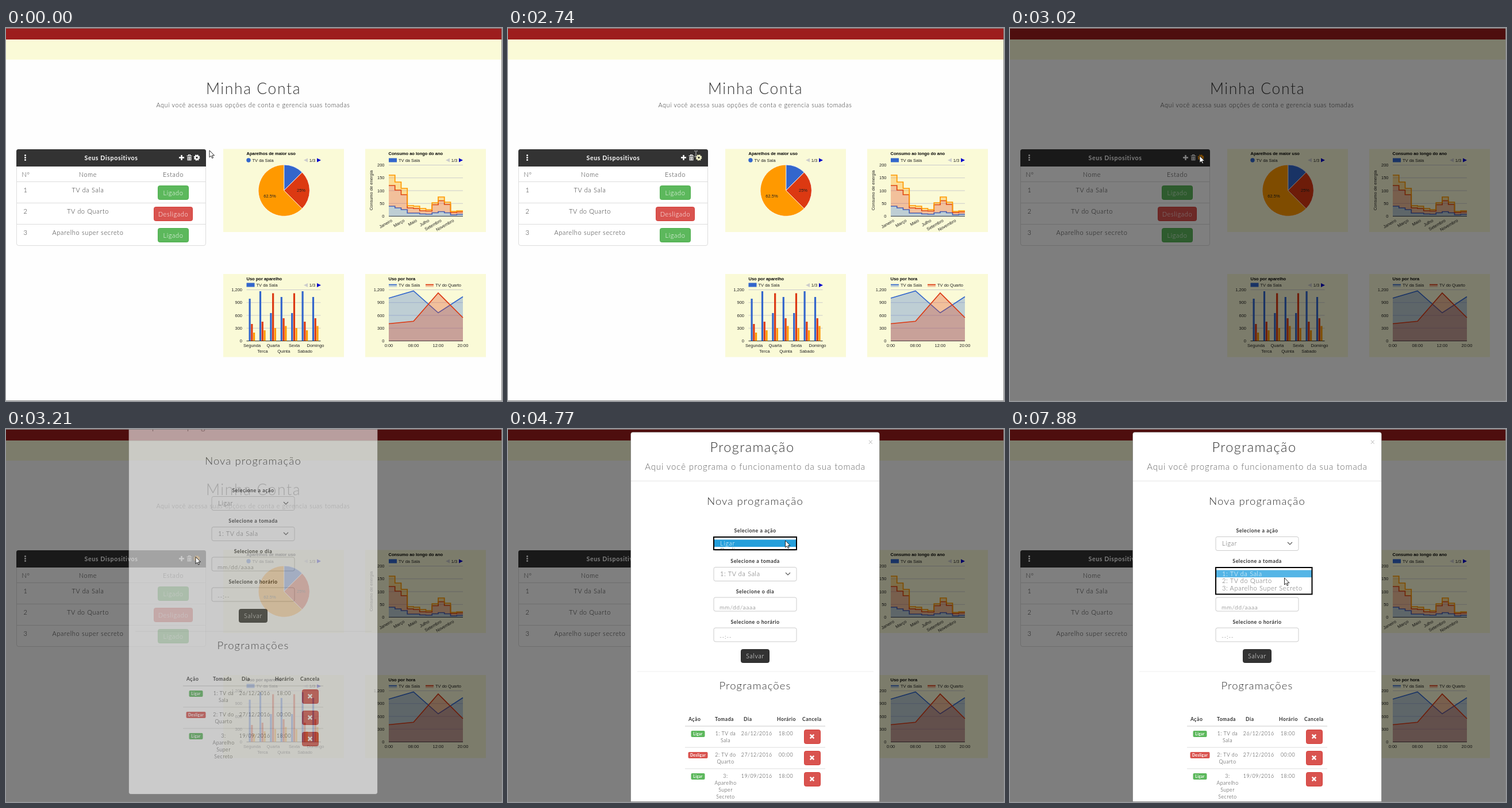
Animation of 863 by 649 pixels, one loop 8 s. Source, as an HTML page:

```html
<!DOCTYPE html>
<html lang="pt">
<head>
<meta charset="utf-8">
<title>Minha Conta</title>
<style>
html, body { margin: 0; width: 100%; height: 100%; overflow: hidden; background: #fff; }
svg { display: block; width: 863px; height: 649px; }
text { font-family: Lato, "Open Sans", sans-serif; font-weight: 300; letter-spacing: .06em; fill: #333; }
.b { font-weight: 700; }
.w { fill: #fff; }
.g { fill: #666; }
.c { font: 7.5px "Liberation Sans", Arial, sans-serif; letter-spacing: 0; fill: #222; }
.cb { font-weight: 700; fill: #000; }
</style>
</head>
<body>
<svg id="stage" viewBox="0 0 863 649" xmlns="http://www.w3.org/2000/svg"></svg>
<script>
const BLUE = '#3366cc', RED = '#dc3912', ORANGE = '#ff9900', CREAM = '#fafad7';
const GREEN_BTN = '#5cb85c', RED_BTN = '#d9534f';

const rect = (x, y, w, h, fill, more = '') =>
  `<rect x="${x}" y="${y}" width="${w}" height="${h}" fill="${fill}" ${more}/>`;
const text = (s, x, y, size, cls = '', anchor = 'middle', more = '') =>
  `<text x="${x}" y="${y}" class="${cls}" text-anchor="${anchor}" style="font-size:${size}px" ${more}>${s}</text>`;
const path = (d, fill, more = '') => `<path d="${d}" fill="${fill}" ${more}/>`;
const line = (d, color, w = 1) => path(d, 'none', `stroke="${color}" stroke-width="${w}"`);
const group = (id, body, more = '') => `<g id="${id}" ${more}>${body}</g>`;
const label = (s, x, y, anchor = 'start', cls = '', more = '') =>
  text(s, x, y, 7.5, 'c ' + cls, anchor, more);
const button = (x, y, w, h, fill, edge, r = 3) =>
  rect(x + .5, y + .5, w - 1, h - 1, fill, `rx="${r}" stroke="${edge}"`);

function devices() {
  let s = rect(18.5, 211.5, 329, 167, '#fff', 'rx="3.5" stroke="#ddd"');
  s += path('M18 241V214.500Q18 211 21.500 211H344.500Q348 211 348 214.500V241Z', '#333');
  for (const y of [267.5, 304.5, 341.5]) s += line(`M18 ${y}H348`, '#ddd');
  s += text('Seus Dispositivos', 183, 229.500, 10.6, 'b w');
  for (const y of [221.5, 225.5, 229.5]) s += `<circle cx="33.500" cy="${y}" r="1.500" fill="#fff"/>`;
  s += line('M301 225.500H310M305.500 221V230', '#fff', 2.4);
  s += line('M314.500 222.500H323.500M317.500 222V220.500H320.500V222', '#fff', 1.2);
  s += path('M315.500 224H322.500V230.500H315.500Z', '#ddd') + line('M317.500 225V229.500M320.500 225V229.500', '#555', .8);
  s += group('gear',
    `<circle cx="332" cy="225.500" r="3" fill="none" stroke="currentColor" stroke-width="2.600"/>
     <circle cx="332" cy="225.500" r="4.500" fill="none" stroke="currentColor" stroke-width="1.800" stroke-dasharray="2 1.534"/>`);
  s += text('Nº', 34.500, 258.500, 11) + text('Nome', 142.500, 258.500, 11) + text('Estado', 291, 258.500, 11);
  [['TV da Sala', 1], ['TV do Quarto', 0], ['Aparelho super secreto', 1]].forEach(([name, on], i) => {
    const y = 37 * i, w = on ? 54 : 68;
    s += text(i + 1, 34, 285.500 + y, 11) + text(name, 142.500, 285.500 + y, 11);
    s += button(291 - w / 2, 274 + y, w, 25, on ? GREEN_BTN : RED_BTN, on ? '#4cae4c' : '#d43f3a');
    s += text(on ? 'Ligado' : 'Desligado', 291, 291 + y, 11, 'w');
  });
  return s;
}

// Shared chart frame: panel, title and, where present, a pager
function frame(x, y, title, pager) {
  let s = rect(x, y, 210, 144.5, CREAM) + label(title, x + 40.5, y + 10.5, 'start', 'cb');
  if (pager) {
    s += path(`M${x + 140} ${y + 19.5}l7 -3.500v7z`, '#ccc');
    s += path(`M${x + 170} ${y + 19.5}l-7 -3.500v7z`, '#00c');
    s += label('1/3', x + 155, y + 22.3, 'middle', '', 'style="fill:#00c"');
  }
  return s;
}

function grid(x, y, names) {
  return names.map((n, i) => {
    const gy = y + i * 22.25, last = i === names.length - 1;
    return line(`M${x} ${gy}h129`, last ? '#333' : '#ccc') + label(n, x - 7.5, gy + 2.7, 'end');
  }).join('');
}

function pie() {
  const cx = 483.7, cy = 282.7, r = 44.7;
  const at = f => `${cx + r * Math.sin(f * 2 * Math.PI)} ${cy - r * Math.cos(f * 2 * Math.PI)}`;
  const slice = (a, b, c) =>
    path(`M${cx} ${cy}L${at(a)}A${r} ${r} 0 ${b - a > .5 ? 1 : 0} 1 ${at(b)}Z`, c, 'stroke="#fff" stroke-width=".8"');
  return frame(378, 210.5, 'Aparelhos de maior uso', 1) +
    `<circle cx="422" cy="230" r="3.700" fill="${BLUE}"/>` + label('TV da Sala', 428.5, 232.8) +
    slice(0, .125, BLUE) + slice(.125, .375, RED) + slice(.375, 1, ORANGE) +
    label('25%', 513.5, 285.2, 'middle', 'w', 'style="fill:#fff"') +
    label('62.5%', 459, 295.3, 'middle', 'w', 'style="fill:#fff"');
}

function year() {
  const w = 10.75, x0 = 666;
  const tops = [
    [310, 313, 316, 322, 322, 323.5, 324, 321.5, 319.5, 321.5, 325, 324],
    [274, 282, 290, 313, 314, 318, 318.5, 307.5, 300.5, 307, 321, 320],
    [256, 268, 279, 309, 310, 314, 316, 304, 294, 303, 319, 318]
  ];
  const steps = a => a.map((y, i) => `${x0 + i * w},${y} ${x0 + (i + 1) * w},${y}`);
  let s = frame(625, 210.5, 'Consumo ao longo do ano', 1) + rect(666, 226.5, 14, 7, BLUE) +
    label('TV da Sala', 683, 232.8) + grid(666, 238.5, [200, 150, 100, 50, 0]);
  tops.forEach((t, i) => {
    const base = i ? steps(tops[i - 1]) : steps(t.map(() => 327.5));
    const back = base.join(' ').split(' ').reverse().join(' ');
    const c = [BLUE, RED, ORANGE][i];
    s += `<polygon points="${steps(t).join(' ')} ${back}" fill="${c}" fill-opacity=".3"/>`;
    s += `<polyline points="${steps(t).join(' ')}" fill="none" stroke="${c}" stroke-width="1.700"/>`;
  });
  ['Janeiro', 'Março', 'Maio', 'Julho', 'Setembro', 'Novembro'].forEach((m, i) => {
    const x = 672.5 + i * w * 2;
    s += label(m, x, 336.5, 'end', '', `transform="rotate(-30 ${x} 336.500)"`);
  });
  return s + label('Consumo de energia', 638, 282.5, 'middle', '', 'style="font-style:italic" transform="rotate(-90 638 282.500)"');
}

function bars() {
  const tops = [
    [471, 458, 496, 468, 496, 458, 468],
    [515, 511, 461.5, 505, 461.5, 511, 505],
    [530, 526, 522, 518.5, 522, 526, 518.5]
  ];
  let s = frame(378, 428, 'Uso por aparelho', 1) + rect(418.5, 443.5, 14, 7, BLUE) +
    label('TV da Sala', 435.5, 450.2) + grid(418.5, 455.5, ['1,200', 900, 600, 300, 0]);
  ['Segunda', 'Terca', 'Quarta', 'Quinta', 'Sexta', 'Sabado', 'Domingo'].forEach((d, i) => {
    const x = 422.5 + i * 18.4;
    tops.forEach((t, k) => s += rect(x + k * 3.75, t[i], 3.2, 544.3 - t[i], [BLUE, RED, ORANGE][k]));
    s += label(d, x + 5.6, i % 2 ? 565 : 555, 'middle');
  });
  return s;
}

function hours() {
  const xs = [666, 709, 752, 795];
  let s = frame(625, 428, 'Uso por hora') + grid(666, 455.5, ['1,200', 900, 600, 300, 0]);
  [[BLUE, 666, 'TV da Sala', [470, 457.5, 495.5, 467.5]], [RED, 730, 'TV do Quarto', [514.5, 510.3, 461, 504]]]
    .forEach(([c, x, name, ys]) => {
      const d = 'M' + xs.map((px, i) => px + ' ' + ys[i]).join('L');
      s += path(d + 'V544.500H666Z', c, 'fill-opacity=".3"') + line(d, c, 1.6);
      s += rect(x, 446.5, 14, 4, c, 'fill-opacity=".3"') + line(`M${x} 446.500h14`, c, 1.6);
      s += label(name, x + 17, 450.2);
    });
  ['0:00', '08:00', '12:00', '20:00'].forEach((h, i) => s += label(h, xs[i], 555, 'middle'));
  return s;
}

function modal() {
  const field = y => rect(358, y + .5, 144, 24, '#fff', 'rx="3" stroke="#ccc"');
  const arrow = y => line(`M483 ${y}l4 4l4 -4`, '#555', 1.1);
  let s = rect(213.5, 5.5, 433, 700, '#fff', 'rx="4" stroke="#000" stroke-opacity=".25"');
  s += text('Programação', 425, 40, 23.5) + text('×', 631.3, 28, 15, '', 'middle', 'fill-opacity=".45"');
  s += text('Aqui você programa o funcionamento da sua tomada', 430, 71, 15, 'g');
  s += line('M214 90.500H646', '#e5e5e5') + text('Nova programação', 430, 132, 18.5);
  ['Selecione a ação', 'Selecione a tomada', 'Selecione o dia', 'Selecione o horário']
    .forEach((n, i) => s += text(n, 430, 180.3 + i * 53, 8.8, 'b') + field(187 + i * 53 - (i > 1 ? .5 : 0)));
  s += text('Ligar', 369, 203, 11, 'g', 'start') + arrow(197);
  s += text('1: TV da Sala', 369, 256, 11, 'g', 'start') + arrow(250);
  s += text('mm/dd/aaaa', 368, 313.5, 10.5, 'g', 'start') + text('--:--', 368, 365, 10.5, 'g', 'start');
  s += button(405, 383, 50, 24, '#333', '#2a2a2a') + text('Salvar', 430, 399, 11, 'w');
  s += line('M225 422H636', '#eee') + text('Programações', 430, 453, 18.5);
  [['Ação', 314], ['Tomada', 360], ['Dia', 410], ['Horário', 468], ['Cancela', 512]]
    .forEach(([n, x]) => s += text(n, x, 507.5, 8.6, 'b', 'start'));
  s += line('M308 517H552', '#ddd', 1.5) + line('M308 554H552M308 591H552', '#ddd');
  [[1, '26/12/2016', '18:00', ['1: TV da', 'Sala']],
   [0, '27/12/2016', '00:00', ['2: TV do', 'Quarto']],
   [1, '19/09/2016', '18:00', ['3:', 'Aparelho', 'Super', 'Secreto']]].forEach(([on, day, hour, plug], i) => {
    const y = 37 * i, w = on ? 24 : 34;
    s += rect(330.5 - w / 2, 525 + y, w, 11, on ? GREEN_BTN : RED_BTN, 'rx="2"');
    s += text(on ? 'Ligar' : 'Desligar', 330.5, 533 + y, 6.6, 'b w');
    plug.forEach((p, k) => s += text(p, 378.5, 533 + y + k * 12, 8.8));
    s += text(day, 432.7, 533 + y, 8.8) + text(hour, 483.5, 533 + y, 8.8);
    s += button(515, 523 + y, 29, 25, RED_BTN, '#d43f3a');
    s += line(`M525.700 ${531.7 + y}l6.600 6.600m0 -6.600l-6.600 6.600`, '#fff', 2.5);
  });
  return s;
}

// Open list of options; shades holds one background per row
function list(y, w, h, items, shades) {
  const inner = items.map((n, i) => {
    const c = shades[i];
    return (c ? rect(358, y + 5.5 + i * 12.4, w, 12.6, c) : '') +
      text(n, 369, y + 16 + i * 12.4, 11, c && c[1] < 'a' && c !== '#d9d9d9' ? 'w' : 'g', 'start');
  }).join('');
  return `<svg x="0" y="0" width="863" height="${y + h}">${rect(358, y, w, h, '#fff')}${inner}</svg>` +
    rect(358, y + 1, w, h - 2, 'none', 'stroke="#000" stroke-width="2"');
}

const stage = document.getElementById('stage');
stage.innerHTML =
  rect(0, 0, 863, 649, '#fefefe') + rect(0, 1, 862, 19, '#9d1d1d') + rect(0, 20, 862, 35, CREAM) +
  text('Minha Conta', 430.5, 115, 26.5) +
  text('Aqui você acessa suas opções de conta e gerencia suas tomadas', 430, 138, 10.8) +
  devices() + pie() + year() + bars() + hours() +
  rect(0, 1, 862, 647, '#000', 'id="shade"') + group('modal', modal()) + group('menu', '') +
  line('M0 .500H862.500V648.500H0', '#858585') +
  group('arrow', path('M0 0V12L2.800 9.500L4.700 13.600L6.500 12.800L4.700 8.800H8.500Z', '#fff', 'stroke="#111" stroke-width=".9"')) +
  group('beam', line('M-3 0H-.500M.500 0H3M0 .500V9.500M-3 10H-.500M.500 10H3', '#ccc'));

const el = id => document.getElementById(id);
const [shade, box, menu, arrow, beam, gear] = ['shade', 'modal', 'menu', 'arrow', 'beam', 'gear'].map(el);

// Each track is a list of [start time, value...]; values hold until the next entry
const pointer = [
  [0, 354, 213], [120, 330, 220], [330, 342, 214], [1660, 334, 213], [1800, 327, 214, 1],
  [2900, 330, 222.5], [3340, 345, 219], [3460, 358.5, 216], [3670, 375, 214], [3840, 410, 208], [4030, 452, 200],
  [4240, 482.5, 194], [5200, 475, 194], [5510, 466, 194], [5790, 463, 197], [5970, 460, 200], [6160, 457, 203],
  [6730, 495, 233], [6890, 499, 244], [7040, 498, 247], [7190, 488, 246], [7740, 483, 251], [7880, 477.5, 259]
];
const dim = [[0, 0], [2900, .25], [3020, .5]];
const slide = [[0, 0, 0], [3210, -70, .6], [3340, -22, 1], [3460, -3, 1], [3670, 0, 1]];
const ACTIONS = ['Ligar', 'Desligar'];
const PLUGS = ['1: TV da Sala', '2: TV do Quarto', '3: Aparelho Super Secreto'];
const HOT = '#259fdb', SOFT = '#55b5e6';
const menus = [
  [0], [4770, 187, 144, 24, ACTIONS, [HOT]], [4930, 187, 144, 36, ACTIONS, [HOT]],
  [6730, 187, 144, 36, ACTIONS, [HOT, '#d9d9d9']], [6890, 187, 144, 36, ACTIONS, [SOFT, SOFT]],
  [7040, 187, 144, 36, ACTIONS, ['', HOT]], [7460],
  [7600, 240, 167.5, 30, PLUGS, [HOT]], [7740, 240, 167.5, 48.5, PLUGS, [HOT]], [7880, 240, 167.5, 48.5, PLUGS, [SOFT]]
];
const pick = (track, t) => track.findLast(k => k[0] <= t);

let shown;
function draw(t) {
  const [, x, y, text] = pick(pointer, t);
  arrow.setAttribute('transform', `translate(${x} ${y})`);
  beam.setAttribute('transform', `translate(${x} ${y})`);
  arrow.style.display = text ? 'none' : '';
  beam.style.display = text ? '' : 'none';
  const hot = (t >= 120 && t < 330) || t >= 2900;
  gear.setAttribute('color', hot ? ORANGE : t >= 1660 ? '#f5f5c8' : '#fff');
  shade.setAttribute('opacity', pick(dim, t)[1]);
  const [, dy, alpha] = pick(slide, t);
  box.setAttribute('transform', `translate(0 ${dy})`);
  box.setAttribute('opacity', alpha);
  const open = pick(menus, t);
  if (open !== shown) {
    menu.innerHTML = open.length > 1 ? list(...open.slice(1)) : '';
    shown = open;
  }
}

const start = performance.now();
function tick() {
  draw((performance.now() - start) % 8000);
  requestAnimationFrame(tick);
}
draw(0);
tick();
</script>
</body>
</html>
```
